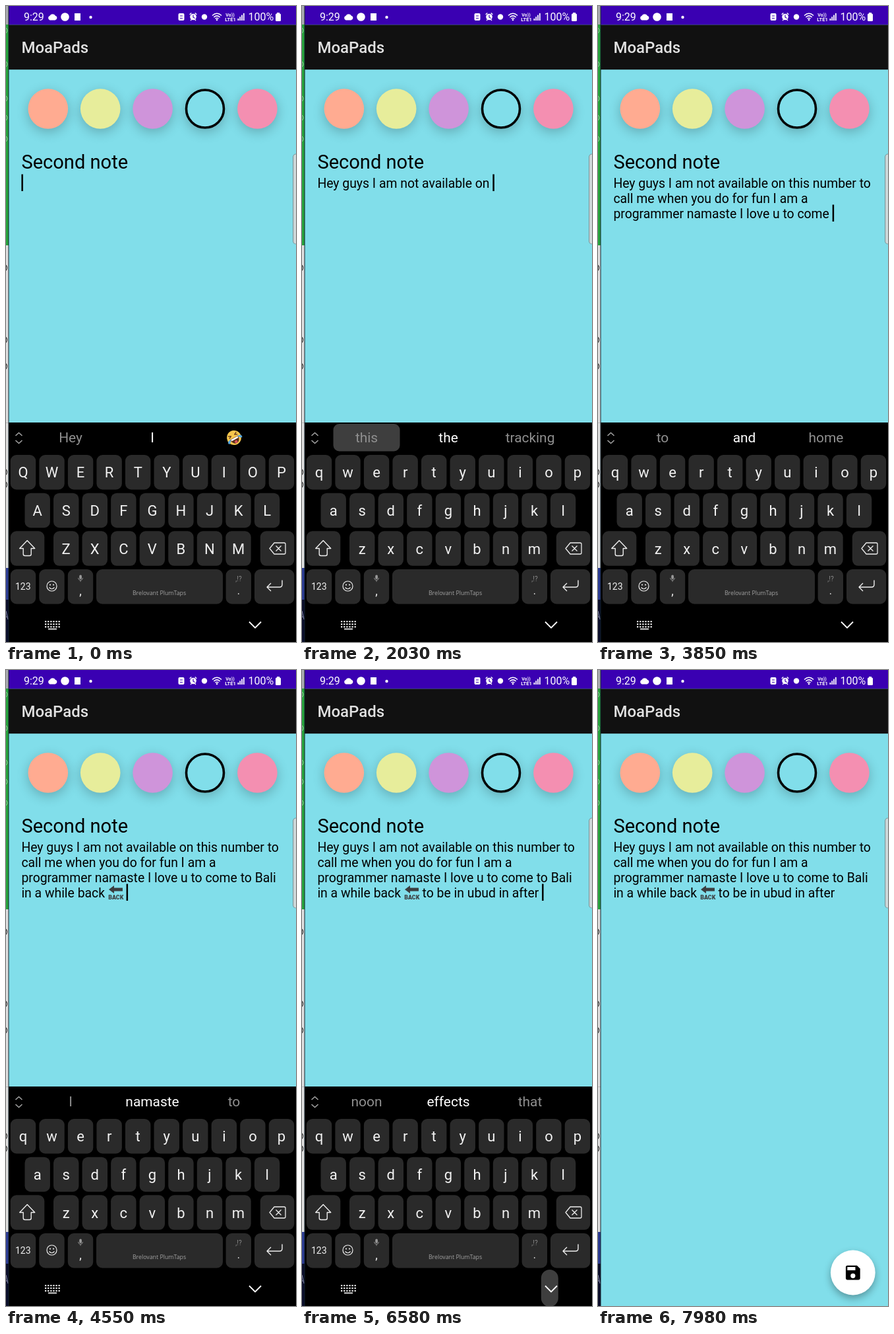
Recreate the animation shown at these times as an HTML page with a canvas. Size 440 px wide and 962 px high, loop 8 s.

```html
<!DOCTYPE html>
<html lang="en">
<head>
<meta charset="utf-8">
<title>Note typing</title>
<style>
html, body { margin: 0; width: 100%; height: 100%; overflow: hidden; background: #000; }
canvas { display: block; width: 440px; height: 962px; }
</style>
</head>
<body>
<canvas id="stage"></canvas>
<script>
const W = 440, H = 962, LOOP = 8000;
const canvas = document.getElementById('stage');
const dpr = window.devicePixelRatio || 1;
canvas.width = W * dpr;
canvas.height = H * dpr;
const ctx = canvas.getContext('2d');

const FONT = 'Roboto, sans-serif';
const TEAL = '#81deea', KEY = '#2a2a2a', PRESSED = '#3e3e3e';
const BACK = '<back>', LAUGH = '<laugh>';
const MARGIN = 23.4, PITCH = 43.55;
const CLOSE = { press: 6510, start: 6650, length: 210 };

// Each entry: the word entered next, then the three suggestions shown before it.
const WORDS = `Hey|Hey,I,${LAUGH}
guys|I,guys,how
I|I,and,please
am|have,am,will
not|a,not,in
available|available,going,sure
on|for,on,to
this|this,the,tracking
number|number,is,time
to|to,and,is
call|the,be,call
me|me,you,and
when|when,and,if
you|you,I,the
do|are,get,do
for|not,it,for
fun|the,you,fun
I|and,I,with
am|have,am,will
a|a,not,in
programmer|programmer,bit,little
namaste|and,namaste,in
I|I,to,and
love|am,love,have
u|you,the,u
to|to,so,and
come|be,come,see
to|to,and,home
Bali|the,my,Bali
in|in,and,for
a|the,a,my
while|few,while,bit
back|and,back,I
${BACK}|to,${BACK},and
to|I,namaste,to
be|the,be,get
in|in,a,there
ubud|the,a,my
in|and,in,for
after|the,a,after
|noon,effects,that`.split('\n').map(row => {
  const [word, list] = row.split('|');
  return { word, picks: list.split(',') };
});

// [first word, time, ms per word]
const PACE = [[0, 910, 280], [3, 1680, 105], [7, 2100, 90], [19, 3220, 90],
              [34, 4760, 285], [37, 5810, 280]];

function enterTime(i) {
  const [first, start, step] = PACE.filter(p => p[0] <= i).pop();
  return start + (i - first) * step;
}

function text(str, x, y, size, color, align = 'left', weight = 400, family = FONT) {
  ctx.font = `${weight} ${size}px ${family}`;
  ctx.textAlign = align;
  ctx.fillStyle = color;
  ctx.fillText(str, x, y);
}

function rect(x, y, w, h, color) {
  ctx.fillStyle = color;
  ctx.fillRect(x, y, w, h);
}

function box(x, y, w, h, r, color) {
  ctx.fillStyle = color;
  ctx.beginPath();
  ctx.roundRect(x, y, w, h, r);
  ctx.fill();
}

function disc(x, y, r, color) {
  ctx.fillStyle = color;
  ctx.beginPath();
  ctx.arc(x, y, r, 0, Math.PI * 2);
  ctx.fill();
}

function stroke(path, color, width = 1.4, x = 0, y = 0) {
  ctx.save();
  ctx.translate(x, y);
  ctx.strokeStyle = color;
  ctx.lineWidth = width;
  ctx.lineJoin = 'round';
  ctx.stroke(new Path2D(path));
  ctx.restore();
}

function fill(path, color, x = 0, y = 0, scale = 1) {
  ctx.save();
  ctx.translate(x, y);
  ctx.scale(scale, scale);
  ctx.fillStyle = color;
  ctx.fill(new Path2D(path), 'evenodd');
  ctx.restore();
}

function shadowed(alpha, blur, dy, draw) {
  ctx.save();
  ctx.shadowColor = `rgba(0,0,0,${alpha})`;
  ctx.shadowBlur = blur * dpr;
  ctx.shadowOffsetY = dy * dpr;
  draw();
  ctx.restore();
}

function drawStrip() {
  rect(0, 0, 4, H, '#dedede');
  rect(0, 0, 4, 28, '#a9a9b0');
  rect(0, 28, 4, 334, '#27a23c');
  for (const y of [37, 88, 140, 169, 201]) stroke('M0 -4Q4 0 0 4', '#9ad0a2', 1, 0, y);
  for (const y of [396, 505, 545, 705, 724]) stroke('M0 -4Q3 0 0 4', '#333', 1.3, 0, y);
  rect(0, 630, 4, 1, '#bbb');
  rect(0, 850, 4, 48, '#2c3c93');
  rect(0, 898, 4, 64, '#0b0e2a');
  stroke('M0 -7L3 6M0 2H2', '#8c90b0', 1, 0, 922);
  rect(3.5, 0, 1, H, '#10202a');
}

function drawStatus() {
  rect(4, 0, W - 4, 28.5, '#3a00b2');
  text('9:29', 27, 22, 16, '#fff');
  fill('M66.5 21.5a3.6 3.6 0 0 1 0-6.8a4.8 4.8 0 0 1 8.4 0a3.5 3.5 0 0 1 -.5 6.8z', '#fff');
  disc(89.5, 16.5, 6.3, '#fff');
  rect(104, 11, 9, 11, '#fff');
  disc(128.5, 17, 2.2, '#fff');

  box(261.5, 11, 9, 11, 2, '#fff');
  stroke('M264 15h4M264 18.5h4M264 9.8h4', '#3a00b2', 1.2);
  disc(284, 16.5, 4.8, '#fff');
  stroke('M284 13.5V17L286.5 18.5', '#3a00b2', 1.2);
  stroke('M278.7 13L281.3 10.5M289.3 13L286.7 10.5M280 22L281.5 20.5M288 22L286.5 20.5', '#fff', 1.4);
  disc(301, 16.5, 4.2, '#fff');
  stroke('M313 14.5Q320 8 327 14.5M315.3 17Q320 12.7 324.7 17M317.5 19.3Q320 17.2 322.5 19.3', '#fff', 1.5);
  disc(320, 21, 1.3, '#fff');
  text('Vo))', 340, 15.5, 7, '#fff', 'center', 700);
  text('LTE1', 340.5, 22.5, 7.5, '#fff', 'center', 700);
  for (let i = 0; i < 4; i++) rect(351.5 + i * 2.8, 19 - i * 2.7, 1.8, 3 + i * 2.7, '#fff');
  text('100%', 367.5, 22, 16, '#fff');
  box(409, 11.5, 8, 11.5, 1.5, '#fff');
  rect(411, 10, 4, 2, '#fff');

  rect(4, 28.5, W - 4, 67.7, '#111');
  text('MoaPads', MARGIN, 71.3, 24, '#e1e1e1', 'left', 500);
}

function drawSwatches() {
  const colors = ['#ffab91', '#e7ed9b', '#cf94da', TEAL, '#f48fb1'];
  colors.forEach((color, i) => {
    const x = 63.8 + i * 79.4, y = 155.5;
    shadowed(0.23, 18, 5, () => disc(x, y, 30.3, color));
    if (i !== 3) return;
    ctx.strokeStyle = '#000';
    ctx.lineWidth = 3.6;
    ctx.beginPath();
    ctx.arc(x, y, 28.5, 0, Math.PI * 2);
    ctx.stroke();
  });
}

function drawBackArrow(x, y) {
  fill('M.5 -12L8.5 -18V-14.6H21.5V-9.4H8.5V-6z', '#3b3d3f', x, y);
  text('BACK', x + 11.3, y + 3.2, 8.8, '#3b3d3f', 'center', 900);
}

function drawLaugh(x, y) {
  ctx.save();
  ctx.translate(x, y);
  ctx.rotate(-0.5);
  disc(0, 0, 11, '#f6c64c');
  fill('M-7 0H7Q6 9 0 9T-7 0z', '#5c2f1c');
  fill('M-6 .5H6L5.5 3H-5.5z', '#fff');
  disc(0, 6.8, 2.2, '#d9535a');
  stroke('M-7 -6L-3 -4L-7 -2M7 -6L3 -4L7 -2', '#5c2f1c', 1.3);
  fill('M-6 0Q-13 0 -11.5 5Q-8 6 -6 0zM6 0Q13 0 11.5 5Q8 6 6 0z', '#58a9e0');
  ctx.restore();
}

function drawNote(count, cursor) {
  const size = 19.38, ink = '#000';
  text('Second note', MARGIN, 246, 29.07, ink);
  ctx.font = `400 ${size}px ${FONT}`;
  const space = ctx.measureText(' ').width;
  let x = MARGIN, y = 275;
  for (const { word } of WORDS.slice(0, count)) {
    const isArrow = word === BACK;
    const width = isArrow ? 23 : ctx.measureText(word).width;
    if (x + width > 418) {
      x = MARGIN;
      y += 23;
    }
    if (isArrow) {
      drawBackArrow(x + 0.7, y);
      ctx.font = `400 ${size}px ${FONT}`;
    } else text(word, x, y, size, ink);
    x += width + space;
  }
  if (cursor) rect(x, y - 20.5, 2.5, 25.5, ink);
}

function drawSaveButton() {
  shadowed(0.32, 12, 5, () => disc(386.8, 911.5, 33.9, '#fff'));
  fill('M17 3H5C3.9 3 3 3.9 3 5v14c0 1.1.9 2 2 2h14c1.1 0 2-.9 2-2V7l-4-4z' +
       'M12 19a3 3 0 1 1 0-6a3 3 0 0 1 0 6zM15 9H5V5h10z', '#000', 372.3, 897, 1.21);
}

function drawHandle() {
  box(435, 223.5, 12, 137, 5, '#7e9a9e');
  box(436.2, 224.5, 12, 135, 4, '#cfd9da');
}

function drawSuggestions(count, pressed) {
  const { word, picks } = WORDS[count];
  stroke('M14.5 650L19.5 645.5L24.5 650M14.5 657L19.5 661.5L24.5 657', '#a5a5a5', 1.5);
  picks.forEach((pick, i) => {
    const x = 98 + i * 124;
    if (pressed && pick === word) {
      const half = i === 1 ? 68.5 : 50.5;
      box(x - half, 632, half * 2, 41.5, 9, PRESSED);
    }
    if (pick === LAUGH) drawLaugh(x, 653);
    else if (pick === BACK) {
      box(x - 13, 641, 26, 25, 4, '#aab4b8');
      drawBackArrow(x - 11.5, 660);
    } else text(pick, x, 660.3, 20.9, i === 1 ? '#fff' : '#8f8f8f', 'center');
  });
}

function key(x, y, w) {
  box(x, y, w, 52.5, 9, KEY);
}

function drawKeys(caps) {
  const rows = [['qwertyuiop', 26, 679], ['asdfghjkl', 47.7, 736.7], ['zxcvbnm', 91.2, 794.3]];
  for (const [letters, start, y] of rows) {
    [...letters].forEach((letter, i) => {
      const x = start + i * PITCH;
      key(x - 19.2, y, 38.4);
      text(caps ? letter.toUpperCase() : letter, x, y + 34.4, 22, '#f2f2f2', 'center');
    });
  }
  const white = '#eee';

  key(6.8, 794.3, 51.5);
  stroke('M0 -12L11.5 0H6V8.5Q6 11 3.5 11H-3.5Q-6 11 -6 8.5V0H-11.5z', white, 1.4, 32.2, 820.5);
  key(385.8, 794.3, 51.5);
  stroke('M-12 0L-5 -8.5H10Q12 -8.5 12 -6.5V6.5Q12 8.5 10 8.5H-5z' +
         'M-2.5 -4L5.5 4M5.5 -4L-2.5 4', white, 1.3, 412, 820.5);

  const y = 852;
  for (const x of [26, 69.5, 113, 352.8]) key(x - 19.2, y, 38.4);
  key(137, y, 192);
  key(377, y, 60.3);
  text('123', 25.8, 883, 14, white, 'center');
  stroke('M-7.5 0a7.5 7.5 0 1 0 15 0a7.5 7.5 0 1 0 -15 0M-4 2Q0 6.5 4 2', white, 1.2, 69.5, 877.5);
  disc(67, 875.5, 1.1, white);
  disc(72, 875.5, 1.1, white);
  box(111.3, 860.5, 3.6, 6.5, 1.8, '#999');
  stroke('M109.5 865Q110 868.6 113 868.6T116.5 865M113 868.6V871', '#999', 0.9);
  text(',', 113, 891, 18, white, 'center');
  text('Brelovant PlumTaps', 232.5, 891, 8.8, '#a2a2a2', 'center', 400, '"Open Sans", sans-serif');
  text(',!?', 353, 869.5, 10, '#8a8a8a', 'center');
  text('.', 352.8, 889.5, 16, white, 'center');
  stroke('M419 868.5V875Q419 879 415 879H396M402 873L396 879L402 885', white, 1.4);
}

function drawNav(pressed) {
  for (let row = 0; row < 3; row++) {
    for (let i = 0; i < 6; i++) rect(59 + i * 4.1, 930 + row * 4, 2.3, 2.2, '#e8e8e8');
  }
  rect(64, 941.5, 13, 1.8, '#e8e8e8');
  if (pressed) box(362.8, 907, 26, 56, 13, PRESSED);
  stroke('M369 931.5L378 940.5L387 931.5', '#fff', 1.8);
}

function drawKeyboard(t, count, slide) {
  ctx.save();
  ctx.translate(0, slide * 332);
  rect(4, 630, W - 4, 332, '#000');
  const pressed = count < WORDS.length - 1 && enterTime(count) - t <= 75;
  drawSuggestions(count, pressed);
  drawKeys(count === 0);
  drawNav(t >= CLOSE.press && t < CLOSE.start);
  ctx.restore();
}

function render(t) {
  ctx.setTransform(dpr, 0, 0, dpr, 0, 0);
  let count = 0;
  while (count < WORDS.length - 1 && t >= enterTime(count)) count++;
  const p = Math.min(1, Math.max(0, (t - CLOSE.start) / CLOSE.length));
  const slide = p * p * (3 - 2 * p);

  rect(0, 0, W, H, TEAL);
  drawSwatches();
  drawNote(count, slide < 1);
  drawSaveButton();
  if (slide < 1) drawKeyboard(t, count, slide);
  drawHandle();
  drawStatus();
  drawStrip();
}

const begin = performance.now();
function frame() {
  render((performance.now() - begin) % LOOP);
  requestAnimationFrame(frame);
}
frame();
</script>
</body>
</html>
```
